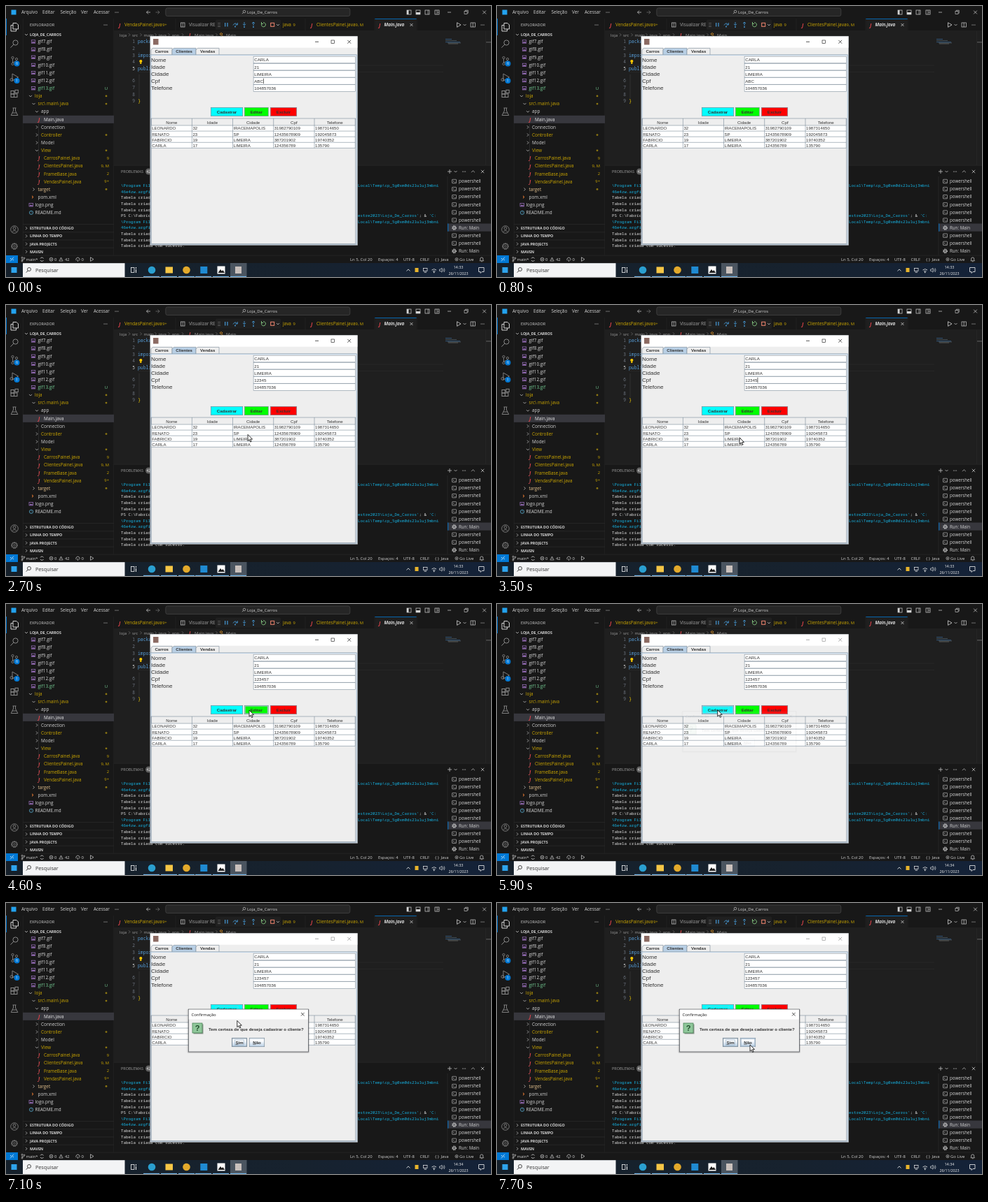
These frames come from a looping animation (692x388 px, 8000 ms). An HTML page:

```html
<!DOCTYPE html>
<html lang="pt-BR">
<head>
<meta charset="utf-8">
<title>Cadastro de clientes</title>
<style>
html, body { margin: 0; width: 100%; height: 100%; overflow: hidden; background: #181818; }
svg { display: block; width: 692px; height: 388px; }
text { white-space: pre; }
</style>
</head>
<body>
<svg id="stage" viewBox="0 0 692 388" xmlns="http://www.w3.org/2000/svg"></svg>
<script>
const UI = "'Open Sans', 'Noto Sans', sans-serif";
const SWING = "'Liberation Sans', Arial, sans-serif";
const MONO = "'Noto Sans Mono', 'Liberation Mono', monospace";
const GREY = '#d4d4d4', GOLD = '#cca700', RED = '#e0434a', EDGE = '#7a8a99', TEAL = '#16b2e2';
const LOOP = 8000;
const out = [];
const add = s => out.push(s);

function rect(x, y, w, h, fill, extra = '') {
  add(`<rect x="${x}" y="${y}" width="${w}" height="${h}" fill="${fill}" ${extra}/>`);
}
function path(d, stroke, w = 0.8, fill = 'none', extra = '') {
  add(`<path d="${d}" stroke="${stroke}" stroke-width="${w}" fill="${fill}" ${extra}/>`);
}
function dot(x, y, r, fill, extra = '') {
  add(`<circle cx="${x}" cy="${y}" r="${r}" fill="${fill}" ${extra}/>`);
}
const ring = (x, y, r, stroke, w = 0.8) => dot(x, y, r, 'none', `stroke="${stroke}" stroke-width="${w}"`);
// y is the vertical middle of the capitals
function text(x, y, s, size, fill, font = UI, extra = '') {
  const safe = s.replace(/&/g, '&amp;').replace(/</g, '&lt;');
  add(`<text x="${x}" y="${(y + size * 0.36).toFixed(2)}" font-size="${size}" fill="${fill}" font-family="${font}" ${extra}>${safe}</text>`);
}
const BOLD = 'font-weight="700"', MID = 'text-anchor="middle"', END = 'text-anchor="end"';
const ui = (x, y, s, fill = GREY, size = 6.4, extra = '') => text(x, y, s, size, fill, UI, extra);
const javaIcon = (x, y) => text(x, y, 'J', 7, RED, UI, BOLD + ' font-style="italic"');
const chevron = (x, y, open, c = GREY) =>
  path(open ? `M${x - 2},${y - 1}l2,2l2,-2` : `M${x - 1},${y - 2}l2,2l-2,2`, c, 0.7);
const cross = (x, y, r, c) => path(`M${x - r},${y - r}l${2 * r},${2 * r}M${x + r},${y - r}l${-2 * r},${2 * r}`, c, 0.7);
const dots = (x, y, c = GREY) => [-2, 0, 2].forEach(d => dot(x + d, y, 0.6, c));
const gear = (x, y, r, c) => {
  ring(x, y, r, c, 0.9);
  dot(x, y, r + 0.9, 'none', `stroke="${c}" stroke-width="1" stroke-dasharray="1.2 1.3"`);
  ring(x, y, r * 0.4, c, 0.6);
};
const imageIcon = (x, y) => {
  rect(x, y - 2.2, 5.4, 4.4, 'none', 'stroke="#a074c4" stroke-width=".7"');
  path(`M${x + 0.5},${y + 1.7}l1.7,-2.2l1.2,1.2l.8,-.7l.9,1.7z`, 'none', 0, '#a074c4');
};

function titleBar() {
  rect(0, 0, 692, 18, '#181818');
  rect(7.5, 5.5, 7, 7, '#23a2ee');
  [['Arquivo', 22], ['Editar', 52], ['Seleção', 77.5], ['Ver', 107], ['Acessar', 125]]
    .forEach(([s, x]) => ui(x, 9, s));
  dots(158, 9);
  path('M206,9h-5.5M203,6.5l-2.5,2.5l2.5,2.5', GREY, 0.7);
  path('M213.5,9h5.5M216.5,6.5l2.5,2.5l-2.5,2.5', '#777', 0.7);
  rect(227.8, 3, 263, 11.5, '#262626', 'rx="2.5" stroke="#484848" stroke-width=".7"');
  ring(340, 8, 1.8, GREY, 0.6);
  path('M338.7,9.4l-1.8,1.8', GREY, 0.7);
  ui(344, 9, 'Loja_De_Carros', GREY, 6);
  [575, 588, 601, 615].forEach((x, i) => {
    rect(x - 3, 6, 6, 6, 'none', `stroke="${GREY}" stroke-width=".7"`);
    if (i == 0) rect(x - 3, 6, 2.5, 6, GREY);
    if (i == 1) rect(x - 3, 9, 6, 3, GREY);
    if (i == 2) path(`M${x + 1},6v6`, GREY, 0.6);
    if (i == 3) path(`M${x},6v6M${x},9h3`, GREY, 0.6);
  });
  path('M630,9h5', GREY, 0.7);
  rect(654, 7.5, 4, 4, 'none', `stroke="${GREY}" stroke-width=".6"`);
  path('M655.3,7.5v-1.3h4v4h-1.3', GREY, 0.6);
  cross(682.5, 9, 2.4, GREY);
}

function activityBar() {
  const c = '#8a8a8a';
  rect(0, 18, 24, 339, '#181818');
  rect(0, 18, 1, 24, '#0078d4');
  path('M10,24.5h5l2.5,2.5v6h-7.5zM10,27.5h-3v8.5h7.5v-3', '#e6e6e6', 0.9);
  ring(13.5, 52.5, 3.6, c, 1);
  path('M10.8,55.2l-4.3,4.5', c, 1);
  ring(9.5, 74, 1.6, c); ring(9.5, 83, 1.6, c); ring(15, 76, 1.6, c);
  path('M9.5,75.6v5.8M15,77.6q0,2.5-5.3,3', c, 0.8);
  path('M9,97l8.5,5l-8.5,5.2z', c, 0.9);
  ring(8, 105.5, 2, c);
  rect(7, 126, 4.5, 4.5, 'none', `stroke="${c}"`);
  rect(11.5, 126, 4.5, 4.5, 'none', `stroke="${c}"`);
  rect(7, 121.5, 4.5, 4.5, 'none', `stroke="${c}"`);
  rect(13, 120.3, 4.3, 4.3, 'none', `stroke="${c}"`);
  path('M9.5,146h5M10.5,146v4l-3.3,6.5h9.6l-3.3,-6.5v-4M9,153h6', c, 0.9);
  [[15.5, 82.5, '6'], [15.5, 107, '1']].forEach(([x, y, s]) => {
    dot(x, y, 4, '#0078d4');
    ui(x, y, s, '#fff', 4.8, MID);
  });
  ring(12, 320, 5.3, c); ring(12, 318.3, 1.9, c);
  path('M8.3,323.8q3.7,-4.5 7.4,0', c);
  gear(12, 344, 3.6, c);
}

function sidebar() {
  rect(24, 18, 130, 339, '#181818');
  path('M24.2,18v339M153.8,18v339', '#2b2b2b', 0.6);
  ui(34, 27, 'EXPLORADOR', GREY, 5.5);
  dots(142, 27);
  chevron(29, 41, true);
  ui(34, 41, 'LOJA_DE_CARROS', GREY, 5.3, BOLD);
  const row = i => 51 + i * 11.13;
  rect(24, row(10) - 5.5, 130, 11.1, '#37373d');
  [7, 8, 9, 10, 11, 12, 13].forEach((n, i) => {
    imageIcon(36.3, row(i));
    ui(45.5, row(i), `gif${n}.gif`, n == 13 ? '#73c991' : GREY);
  });
  ui(143, row(6), 'U', '#73c991', 6, MID);
  // label, indent, kind, colour, mark
  [['loja', 41, 'open', GOLD, '•'], ['src\\ main\\ java', 45.5, 'open', GOLD, '•'], ['app', 50, 'open', GREY],
   ['Main.java', 54, 'java', '#e8e8e8'], ['Connection', 50, '', GREY], ['Controller', 50, '', GOLD, '•'],
   ['Model', 50, '', GREY], ['View', 50, 'open', GOLD, '•'], ['CarrosPainel.java', 54, 'java', GOLD, '9'],
   ['ClientesPainel.java', 54, 'java', GOLD, '9, M'], ['FrameBase.java', 54, 'java', GOLD, '2'],
   ['VendasPainel.java', 54, 'java', GOLD, '9+'], ['target', 45.5, '', '#e2c08d', '•'], ['pom.xml', 45.5, 'xml', GREY],
   ['logo.png', 41.5, 'png', GREY], ['README.md', 41.5, 'md', GREY]
  ].forEach(([s, x, kind, c, mark], i) => {
    const y = row(i + 7);
    if (kind == 'java') javaIcon(x - 8, y);
    else if (kind == 'xml') text(x - 9, y, '\u203a', 8, '#e37933', UI, BOLD);
    else if (kind == 'png') imageIcon(x - 8.5, y);
    else if (kind == 'md') { ring(x - 5.5, y, 2.6, '#519aba', 0.9); ui(x - 5.5, y, 'i', '#519aba', 4.5, MID); }
    else chevron(x - 6, y, kind == 'open');
    ui(x, y, s, c);
    if (mark == '•') dot(143, y, 1.4, '#8c7612');
    else if (mark) ui(147, y, mark, c, 5.8, END);
  });
  path(`M46.5,${row(11) - 5}V${row(18) + 5}`, '#3a3a3a', 0.5);
  ['ESTRUTURA DO CÓDIGO', 'LINHA DO TEMPO', 'JAVA PROJECTS', 'MAVEN'].forEach((s, i) => {
    const y = 318.2 + i * 11.2;
    path(`M24,${y - 5.6}h130`, '#2f2f2f', 0.6);
    chevron(29, y, false);
    ui(34, y, s, GREY, 5.3, BOLD);
  });
}

function tabs() {
  rect(154, 18, 538, 18, '#181818');
  path('M154,35.8h538', '#2b2b2b', 0.6);
  path('M242,18v18M427,18v18M526,18v18M586,18v18', '#2b2b2b', 0.6);
  javaIcon(161, 27);
  ui(169, 27, 'VendasPainel.java', GOLD);
  ui(223, 27, '9+', GOLD, 5.8);
  rect(249.5, 24, 5.5, 6, 'none', 'stroke="#ccc" stroke-width=".7"');
  path('M252.2,24v6', GREY, 0.6);
  ui(261, 27, 'Visualizar RE', '#a5a5a5');
  ui(395, 27, 'java', GOLD);
  ui(409.5, 27, '9', GOLD, 5.8);
  javaIcon(435, 27);
  ui(443, 27, 'ClientesPainel.java', GOLD);
  ui(498.5, 27, '9, M', GOLD, 5.8);
  rect(526.3, 18, 59.4, 18, '#1f1f1f');
  rect(526.3, 18, 59.4, 0.8, '#0078d4');
  javaIcon(532, 27);
  ui(539.5, 27, 'Main.java', '#fff', 6.4, 'font-style="italic" font-weight="600"');
  cross(578.5, 27, 2, '#e6e6e6');

  rect(299, 19.5, 93, 14.5, '#202020', 'rx="1.5"');
  [-1, 1].forEach(dx => [-2.4, 0, 2.4].forEach(dy => dot(304 + dx, 27 + dy, 0.6, '#888')));
  const b = '#4aa5e8';
  path('M312.7,24v5.5M316,24v5.5', b, 1.1);
  path('M324,27.5q3,-5 6,-0.5M330.3,24v3h-3', b, 0.8); dot(327, 29.5, 0.9, b);
  path('M340,23v4.5M338,25.8l2,2l2,-2', b, 0.8); dot(340, 30, 0.9, b);
  path('M353,28v-4.8M351,25l2,-2l2,2', b, 0.8); dot(353, 30, 0.9, b);
  path('M365,25a3,3 0 1 0 2,-1.2M364.5,23v2.5h2.5', '#89d185', 0.9);
  rect(377.7, 24.3, 5, 5, 'none', 'stroke="#f48771" stroke-width="1"');
  chevron(388, 27, true);

  path('M643.5,23.8l5.5,3.2l-5.5,3.3z', GREY, 0.8);
  chevron(654.5, 27, true);
  rect(663, 24, 6.5, 6, 'none', 'stroke="#ccc" stroke-width=".7"');
  path('M666.2,24v6', GREY, 0.7);
  dots(680, 27);
}

function editor() {
  rect(154, 36, 538, 192, '#1f1f1f');
  const c = '#a0a0a0';
  [['loja', 162], ['src', 180], ['main', 196.5], ['java', 217.5], ['app', 236.5], ['Main.java', 269], ['Main', 314]]
    .forEach(([s, x]) => ui(x, 41.3, s, c, 6.1));
  [176, 192.5, 213.5, 232.5, 252, 300.5].forEach(x => chevron(x, 41.3, false, '#777'));
  javaIcon(261, 41.3);
  path('M305,40l2,-1.5l2,1.5l-2,2zM308,42.5l2,1', '#ee9d28', 0.8);
  path('M188,85h436M188,94.5h436', '#2c2c2c', 0.7);
  const ys = [51, 60.7, 70.3, 80, 89.6, 107.2, 116.8, 126.4, 136];
  ys.forEach((y, i) => text(184, y, '' + (i + 1), 6.2, i == 4 ? '#d0d0d0' : '#6e7681', MONO, END));
  [['package app;', 0], ['import View.FrameBase;', 2], ['public class Main {', 4]]
    .forEach(([s, i]) => text(188, ys[i], s, 6.45, '#569cd6', MONO));
  text(188.2, ys[8], '}', 6.45, '#ffd700', MONO);
  path('M190,98v34', '#404040', 0.5);
  dot(192.3, 79, 2.1, '#ffcc00');
  rect(191.3, 81, 2, 2, '#ffcc00');
  // minimap
  [[627, 47, 9, '#35608a'], [627, 49.2, 16, '#4a5a66'], [627, 51.3, 21, '#35608a'], [630, 52.5, 19, '#55616a'], [631, 53.6, 14, '#666']]
    .forEach(([x, y, w, f]) => rect(x, y, w, 0.8, f));
  path('M684.5,36v192', '#2a2a2a', 0.6);
  rect(685, 51.5, 7, 0.8, '#777');
}

function panel() {
  rect(154, 228, 538, 129, '#181818');
  path('M154,228.2h538', '#2b2b2b', 0.7);
  ui(164, 237, 'PROBLEMAS', '#a0a0a0', 5.5);
  dot(203.5, 237, 4.5, '#616161');
  ui(203.5, 237, '42', '#fff', 4.6, MID);
  path('M630,237h6M633,234v6', GREY, 0.7);
  chevron(641.5, 237, true);
  dots(653.5, 237);
  path('M664,238.2l2.4,-2.4l2.4,2.4', GREY, 0.7);
  cross(680, 237, 2.2, GREY);
  const row = i => 257 + i * 8.6, size = 5.83;
  const term = (x, i, s, c = '#e0e0e0') => text(x, row(i), s, size, c, MONO, 'font-weight="500"');
  [0, 6].forEach(i => {
    term(164, i, '\\Program Files', TEAL);
    term(502, i, 'Local\\Temp\\cp_5g0xm0ds2lu1uj3mbni', TEAL);
    term(164, i + 1, '46e4zw.argfile', TEAL);
  });
  [2, 3, 4, 8, 9, 10].forEach(i => term(164, i, 'Tabela criada com sucesso.'));
  term(164, 5, 'PS C:\\Fabrício');
  term(502, 5, "estre2023\\Loja_De_Carros'", TEAL);
  term(589.5, 5, '; & ');
  term(603.5, 5, "'C:", TEAL);
  path('M630,244v113', '#2f2f2f', 0.6);
  rect(630.3, 311.5, 61.7, 11.2, '#37373d');
  rect(630.3, 311.5, 0.9, 11.2, '#0078d4');
  for (let i = 0; i < 10; i++) {
    const y = 251 + i * 11.1, run = i == 6 || i == 9;
    if (run) gear(639.5, y, 2.1, GREY);
    else {
      rect(636.5, y - 2.7, 6, 5.4, 'none', 'stroke="#ccc" stroke-width=".6" rx=".6"');
      path(`M637.8,${y - 1.2}l1.3,1.2l-1.3,1.2M640,${y + 1.3}h1.5`, GREY, 0.5);
    }
    ui(646, y, run ? 'Run: Main' : 'powershell', GREY, 6.2);
  }
}

function statusBar() {
  rect(0, 357, 692, 11, '#181818');
  path('M0,357.2h692', '#2b2b2b', 0.6);
  rect(0, 357, 17, 11, '#0078d4');
  path('M6,361l2.2,2.2l-2.2,2.2M11,359.8l-2.2,2.2l2.2,2.2', '#fff', 0.7);
  const y = 362.7, s = (x, t) => ui(x, y, t, GREY, 5.9);
  ring(23, 360.3, 1, GREY, 0.6); ring(23, 365, 1, GREY, 0.6); ring(26, 361, 1, GREY, 0.6);
  path('M23,361.3v2.7M26,362q0,1.5-3,1.7', GREY, 0.6);
  s(28.5, 'main*');
  path('M49,361.5a2.5,2.5 0 0 1 4.5,0M53.5,364a2.5,2.5 0 0 1 -4.5,0', GREY, 0.8);
  ring(64.5, y, 2.4, GREY, 0.7); cross(64.5, y, 1, GREY);
  s(69, '0');
  path('M78.5,360l2.7,5h-5.4zM78.5,361.8v1.6', GREY, 0.6);
  s(84, '42');
  path('M102.5,363v3M100.5,364.5a2.6,2.6 0 1 1 4,0', GREY, 0.7);
  s(107.5, '0');
  path('M120.5,359.8l4.5,2.8l-4.5,2.8z', GREY, 0.7);
  s(491, 'Ln 5, Col 20'); s(531, 'Espaços: 4'); s(567, 'UTF-8');
  s(590.5, 'CRLF'); s(612, '{ }'); s(620.5, 'Java'); s(647, 'Go Live');
  dot(643, y, 0.8, GREY); ring(643, y, 2.1, GREY, 0.6);
  path('M676,364.8h5.5l-.8,-1.2v-1.6a2,2 0 0 0 -4,0v1.6zM678,365.8h1.6', GREY, 0.7);
}

function taskBar() {
  const ink = '#f2f2f2';
  rect(0, 368, 692, 20, 'url(#bar)');
  rect(7.5, 374, 8, 8, '#2ea3ec');
  rect(24, 368.2, 145.5, 19.8, '#f3f4f5');
  ring(33, 377, 2.5, '#222', 0.8);
  path('M31.3,379l-2.5,2.6', '#222', 0.9);
  ui(42, 378, 'Pesquisar', '#333', 7.2);
  rect(178.5, 374.5, 4.5, 7, 'none', `stroke="${ink}" stroke-width=".8"`);
  path('M185.5,374v2M185.5,377v5', ink, 1);
  dot(208, 378, 5.3, '#2a9fd0');
  rect(227.5, 373.5, 10.5, 9, '#f5c646');
  dot(257.5, 378, 5.3, '#e2a92b');
  rect(277.3, 373, 10, 10, '#1f8ad2');
  rect(301.5, 372.5, 11, 11, '#fff');
  path('M302.5,382l3.5,-5l2,2.7l1.4,-1.7l2.6,4z', 'none', 0, '#1c1c1c');
  rect(320, 368, 23.5, 20, '#4b5560');
  rect(327, 373, 9, 10, '#c9c0bc');
  [196, 221, 246, 270, 295, 320].forEach(x => rect(x, 386.9, 23, 1.1, '#76b9ed'));
  path('M571.5,379.5l2.5,-2.6l2.5,2.6', ink, 0.8);
  rect(583.5, 375, 5, 6, '#e7b42c');
  rect(595.5, 375.5, 5.5, 4, 'none', `stroke="${ink}" stroke-width=".7"`);
  path('M596.5,381.3h3.6', ink, 0.8);
  path('M607.5,378a5,5 0 0 1 6.5,0M609,380a3,3 0 0 1 3.5,0', ink, 0.8);
  dot(610.7, 381.4, 0.8, ink);
  path('M618.5,377h1.5l2,-1.8v6l-2,-1.8h-1.5zM623.5,376.5q1.3,1.7 0,3.5M625,375.3q2,2.8 0,5.8', ink, 0.6);
  text(645.5, 373.8, '14:33', 5.5, ink, UI, MID + ' id="clock"');
  ui(645.5, 383, '26/11/2023', ink, 5.3, MID);
  path('M674.5,374.5h7.5v6h-3l-2,2v-2h-2.5z', ink, 0.8);
}

const buttons = [];
function swingButton(x, y, w, h, label, fill, inDialog, id = '') {
  buttons.push({ x, y, w, h, inDialog });
  rect(x + 0.3, y + 0.3, w - 0.6, h - 0.6, fill, `stroke="${EDGE}" stroke-width=".7" ${id && `id="${id}"`}`);
  text(x + w / 2, y + h / 2, label, 6.08, '#333', SWING, `${BOLD} ${MID}`);
}

function appFrame() {
  const sw = (x, y, s, size = 6.08, extra = '') => text(x, y, s, size, '#333', SWING, extra);
  rect(205.7, 43.2, 296, 299.3, '#eeeeee', 'stroke="#8b939c" stroke-width=".5"');
  rect(206, 43.6, 295.3, 16.2, '#ffffff');
  rect(210, 47, 7.5, 8.5, '#8b6a62');
  add('<g id="controls">');
  path('M441,51.3h5', '#111', 0.7);
  rect(464, 49, 4.6, 4.6, 'none', 'stroke="#111" stroke-width=".6"');
  cross(489.7, 51.3, 2.4, '#111');
  add('</g>');
  [['Carros', 207, 30], ['Clientes', 237, 34], ['Vendas', 271, 33]].forEach(([s, x, w], i) => {
    path(`M${x},70v-7l2.5,-2.6h${w - 2.5}v9.6`, EDGE, 0.6, i == 1 ? '#b8cfe5' : '#eeeeee');
    sw(x + w / 2 + 0.2, 65.2, s, 6.08, `${BOLD} ${MID}`);
  });
  rect(206.6, 69.8, 294, 271.6, '#eeeeee', `stroke="${EDGE}" stroke-width=".5"`);
  rect(207.1, 70.4, 293, 270.5, 'none', 'stroke="#b8cfe5" stroke-width=".9"');
  const vals = ['CARLA', '21', 'LIMEIRA', '', '104857036'];
  ['Nome', 'Idade', 'Cidade', 'Cpf', 'Telefone'].forEach((s, i) => {
    const y = 77 + i * 10.13;
    sw(207, y, s, 8.05);
    rect(353.1, y - 4.8, 145.4, 9.6, '#fff', `stroke="${EDGE}" stroke-width=".55"`);
    sw(354.2, y + 0.2, vals[i], 6.2, i == 3 ? 'id="cpf"' : '');
  });
  add('<path id="caret" stroke="#222" stroke-width=".7"/>');
  swingButton(292, 145, 46, 13, 'Cadastrar', '#00ffff', false, 'save');
  swingButton(340, 145, 34.5, 13, 'Editar', '#00ff00', false);
  swingButton(377, 145, 38, 13, 'Excluir', '#ff0000', false);
  rect(299, 148, 32, 7.2, 'none', 'stroke="#a3b8cc" stroke-width=".5" id="focus"');

  const cols = [207.2, 265.4, 323.5, 381.7, 440, 498.3];
  rect(207.2, 161, 291.6, 179.5, '#eeeeee', `stroke="${EDGE}" stroke-width=".6"`);
  rect(207.2, 171, 291.1, 32.4, '#fff');
  ['Nome', 'Idade', 'Cidade', 'Cpf', 'Telefone'].forEach((s, i) =>
    sw((cols[i] + cols[i + 1]) / 2, 166.6, s, 6.08, MID));
  for (let i = 0; i < 5; i++) path(`M207.2,${171 + i * 8.1}h291.1`, EDGE, 0.6);
  cols.forEach(x => path(`M${x},161v42.4`, EDGE, 0.6));
  [['LEONARDO', '32', 'IRACEMAPOLIS', '31982790109', '1987314650'],
   ['RENATO', '23', 'SP', '12435678909', '192045873'],
   ['FABRICIO', '19', 'LIMEIRA', '387201902', '19740352'],
   ['CARLA', '17', 'LIMEIRA', '124356789', '135790']
  ].forEach((r, i) => r.forEach((s, j) => sw(cols[j] + 1, 175.3 + i * 8.1, s)));
}

function dialog() {
  add('<g id="dialog">');
  rect(258.5, 151.5, 174.5, 63.5, '#000', 'opacity=".16" rx="2"');
  rect(260.4, 152.2, 171, 60.8, '#eeeeee', 'stroke="#55595e" stroke-width=".8"');
  rect(260.8, 152.6, 170.2, 14, '#fff');
  ui(264.5, 159.6, 'Confirmação', '#111', 5.9);
  cross(423.3, 159.3, 2.3, '#111');
  rect(267.5, 173.5, 14, 14, '#8f9a90');
  rect(266, 172, 14, 14, '#8fc79a', 'stroke="#3d7a4b" stroke-width=".7"');
  text(273, 179.2, '?', 11, '#1f4a2a', SWING, `${BOLD} ${MID}`);
  text(289, 181, 'Tem certeza de que deseja cadastrar o cliente?', 6.08, '#333', SWING, BOLD);
  swingButton(322, 193, 22, 13, 'Sim', 'url(#metal)', true);
  rect(322.8, 193.8, 20.4, 11.4, 'none', `stroke="${EDGE}" stroke-width=".8"`);
  rect(326.2, 196, 13.5, 7.2, 'none', 'stroke="#7f9db9" stroke-width=".5"');
  swingButton(347, 193, 22, 13, 'Não', 'url(#metal)', true);
  path('M327.5,202.6h4M352.2,202.6h4.2', '#333', 0.5);
  add('</g>');
}

add(`<defs>
<linearGradient id="metal" x2="0" y2="1"><stop offset="0" stop-color="#dde8f3"/><stop offset=".3" stop-color="#fff"/><stop offset="1" stop-color="#b8cfe5"/></linearGradient>
<linearGradient id="bar"><stop offset="0" stop-color="#15202b"/><stop offset=".6" stop-color="#17222e"/><stop offset="1" stop-color="#142238"/></linearGradient>
</defs>`);
[titleBar, activityBar, sidebar, tabs, editor, panel, statusBar, taskBar, appFrame, dialog].forEach(f => f());
rect(0, 0, 0, 0, 'none', 'id="hover" stroke="#a3b8cc" stroke-width="1.1"');
path('M0,0V9.2L2.1,7.3L3.6,10.6L5.1,10L3.6,6.7H6.5Z', '#000', 0.8, '#fff', 'id="pointer"');
document.getElementById('stage').innerHTML = out.join('');

const [clock, cpf, caret, save, focus, controls, dlg, hover, pointer] =
  ['clock', 'cpf', 'caret', 'save', 'focus', 'controls', 'dialog', 'hover', 'pointer'].map(id => document.getElementById(id));

const typed = [[0, 'ABC'], [1000, 'AB'], [1200, 'A'], [1400, ''], [1600, '1'], [1800, '12'], [1900, '123'],
  [2000, '1234'], [2200, '12345'], [3700, '123457']];
const moves = [[1000, 356, 118], [1400, 345, 185], [2600, 345, 185], [3100, 345.5, 189.3], [3400, 345.5, 189.3],
  [3500, 346, 189.8], [3800, 346, 189.8], [4400, 347, 152], [4600, 347, 152], [4700, 321, 151.2],
  [4800, 314.7, 151.7], [6900, 314.7, 151.7], [7450, 365, 207.5], [7700, 361, 203]];

const show = (el, on) => el.setAttribute('visibility', on ? 'visible' : 'hidden');

function pointerAt(t) {
  const i = moves.findIndex(m => m[0] > t);
  if (i < 0) return moves[moves.length - 1].slice(1);
  if (i == 0) return null;
  const [t0, x0, y0] = moves[i - 1], [t1, x1, y1] = moves[i];
  const p = (t - t0) / (t1 - t0), e = p * p * (3 - 2 * p);
  return [x0 + (x1 - x0) * e, y0 + (y1 - y0) * e];
}

// rollover outline of the button under the pointer
function drawHover(p, inDialog) {
  const b = p && buttons.find(b => b.inDialog == inDialog &&
    p[0] >= b.x && p[0] <= b.x + b.w && p[1] >= b.y && p[1] <= b.y + b.h);
  show(hover, !!b);
  if (!b) return;
  const box = { x: b.x + 1.1, y: b.y + 1.1, width: b.w - 2.2, height: b.h - 2.2 };
  for (const k in box) hover.setAttribute(k, box[k]);
}

function draw(ms) {
  const t = Math.floor(ms / 100) * 100;
  const [since, value] = typed.filter(k => k[0] <= t).pop();
  if (cpf.textContent != value) cpf.textContent = value;
  const cx = 354.7 + (value ? cpf.getComputedTextLength() : 0);
  caret.setAttribute('d', `M${cx},103.8v7.4`);
  const blink = since == 3700 ? t < 4200 || (t >= 4700 && t < 5300) : (t - since) % 1000 < 500;
  show(caret, blink && t < 5600);

  save.setAttribute('fill', t == 5600 ? '#b8cfe5' : '#00ffff');
  show(focus, t >= 5600);
  clock.textContent = t >= 5700 ? '14:34' : '14:33';
  controls.setAttribute('opacity', t >= 5900 ? 0.5 : 1);

  const fade = t < 5900 ? 0 : t < 6000 ? 0.07 : t < 6100 ? 0.65 : 1;
  const scale = t < 6000 ? 0.945 : t < 6100 ? 0.985 : 1;
  show(dlg, fade > 0);
  dlg.setAttribute('opacity', fade);
  dlg.setAttribute('transform', `translate(345.5 182.5) scale(${scale}) translate(-345.5 -182.5)`);

  const p = pointerAt(t);
  drawHover(p, t >= 6000);
  show(pointer, !!p);
  if (p) pointer.setAttribute('transform', `translate(${p[0].toFixed(2)} ${p[1].toFixed(2)})`);
}

const start = performance.now();
function tick() {
  draw((performance.now() - start) % LOOP);
  requestAnimationFrame(tick);
}
tick();
</script>
</body>
</html>
```
